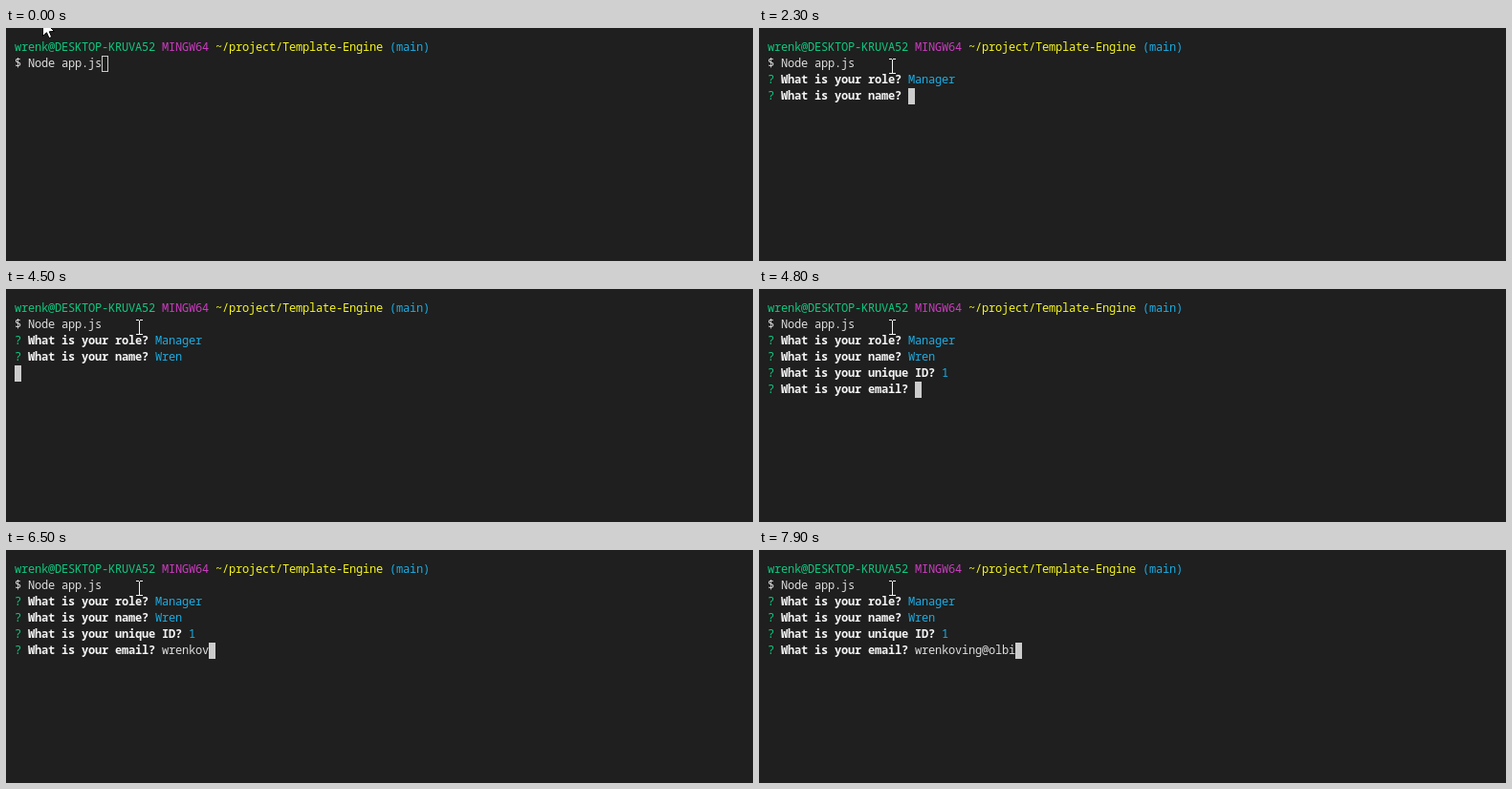
Write an HTML page with a canvas that moves like this. It is 781 by 244 pixels and loops after 8000 ms.

```html
<!DOCTYPE html>
<html lang="en">
<head>
<meta charset="utf-8">
<title>Terminal prompts</title>
<style>
  html, body { margin: 0; height: 100%; overflow: hidden; background: #1e1f1e; }
  canvas { display: block; }
</style>
</head>
<body>
<canvas id="stage" width="781" height="244"></canvas>
<script>
const ctx = document.getElementById('stage').getContext('2d');
const DURATION = 8000;
const CELL = { w: 7, h: 17, left: 9, top: 12, baseline: 12 };
const COLOR = {
  back: '#1e1f1e', caret: '#cccccc', text: '#dedede', bold: '#f4f4f4', green: '#10c880',
  magenta: '#cc3cc0', yellow: '#f5f520', cyan: '#1cacE4'
};
const FONT = '12px "Noto Sans Mono", "DejaVu Sans Mono", monospace';
const REDRAW = -1; // line is cleared, caret back at column 0

// keys: [time, number of typed characters]
const prompts = [
  { row: 3, question: 'What is your name?', answer: 'Wren', done: 4000,
    keys: [[2300, 0], [3300, 1], [3500, 2], [3600, 3], [3700, 4], [3800, REDRAW]] },
  { row: 4, question: 'What is your unique ID?', answer: '1', done: 4800,
    keys: [[4000, 0], [4500, REDRAW], [4600, 1], [4700, REDRAW]] },
  { row: 5, question: 'What is your email?', answer: 'wrenkoving@olbi', done: Infinity,
    keys: [[4800, 0], [5800, 1], [5900, 2], [6000, REDRAW], [6100, 4], [6300, 5], [6500, 7],
           [6700, REDRAW], [7000, 10], [7300, 11], [7600, 12], [7800, 13], [7900, 15]] }
];

const cellX = col => CELL.left + col * CELL.w;
const cellY = row => CELL.top + row * CELL.h;

// Writes on the character grid and returns the next free column.
function write(row, col, text, color, weight = 500) {
  ctx.font = `${weight} ${FONT}`;
  ctx.fillStyle = color;
  for (const char of text) ctx.fillText(char, cellX(col++), cellY(row) + CELL.baseline);
  return col;
}

function caret(row, col, focused = true) {
  const x = cellX(col), y = cellY(row);
  if (focused) {
    ctx.fillStyle = COLOR.caret;
    ctx.fillRect(x, y, CELL.w, CELL.h);
  } else {
    ctx.strokeStyle = COLOR.caret;
    ctx.lineWidth = 1;
    ctx.strokeRect(x + 0.5, y + 0.5, CELL.w - 1, CELL.h - 1);
  }
}

function ask(row, question) {
  write(row, 0, '?', COLOR.green);
  return write(row, 2, question, COLOR.bold, 700) + 1;
}

function drawShell() {
  let col = write(0, 0, 'wrenk@DESKTOP-KRUVA52', COLOR.green);
  col = write(0, col + 1, 'MINGW64', COLOR.magenta);
  col = write(0, col + 1, '~/project/Template-Engine', COLOR.yellow);
  write(0, col + 1, '(main)', COLOR.cyan);
  return write(1, 0, '$ Node app.js', COLOR.text);
}

function drawRole(t) {
  const col = ask(2, 'What is your role?');
  if (t >= 2300) {
    write(2, col, 'Manager', COLOR.cyan);
    return;
  }
  write(2, col, '(Use arrow keys)', COLOR.text);
  write(3, 0, '> Manager', COLOR.cyan);
  write(4, 2, 'Engineer', COLOR.text);
  write(5, 2, 'Intern', COLOR.text);
}

function drawPrompt({ row, question, answer, done, keys }, t) {
  const key = keys.findLast(([time]) => time <= t);
  if (!key) return;
  if (t >= done) {
    write(row, ask(row, question), answer, COLOR.cyan);
  } else if (key[1] === REDRAW) {
    caret(row, 0);
  } else {
    caret(row, write(row, ask(row, question), answer.slice(0, key[1]), COLOR.text));
  }
}

function drawArrow(x, y) {
  const outline = [[0, 0], [0, 17], [4, 13.3], [6.5, 19], [9.2, 18], [6.8, 12.3], [12, 12]];
  ctx.beginPath();
  for (const [dx, dy] of outline) ctx.lineTo(x + dx, y + dy);
  ctx.closePath();
  ctx.fillStyle = '#fff';
  ctx.fill();
  ctx.strokeStyle = '#000';
  ctx.lineWidth = 1;
  ctx.stroke();
}

function drawBeam(x, y) {
  ctx.fillStyle = '#f4f4f4';
  ctx.fillRect(x, y - 7, 1, 15);
  for (const end of [y - 8, y + 7]) {
    ctx.fillRect(x - 3, end, 3, 1);
    ctx.fillRect(x + 1, end, 3, 1);
  }
}

function drawMouse(t) {
  const step = Math.min(Math.floor(t / 100), 4);
  const eased = 1 - (1 - step / 4) ** 2;
  if (step === 0) drawArrow(38.5, -8.5);
  else drawBeam(Math.round(39 + 100 * eased), Math.round(-8 + 48 * eased));
}

function draw(t) {
  ctx.fillStyle = COLOR.back;
  ctx.fillRect(0, 0, 781, 244);
  const end = drawShell();
  if (t < 1200) caret(1, end, t >= 500);
  else if (t < 1400) caret(2, 0);
  else drawRole(t);
  for (const prompt of prompts) drawPrompt(prompt, t);
  drawMouse(t);
}

const start = performance.now();
function frame() {
  draw((performance.now() - start) % DURATION);
  requestAnimationFrame(frame);
}
frame();
</script>
</body>
</html>
```
